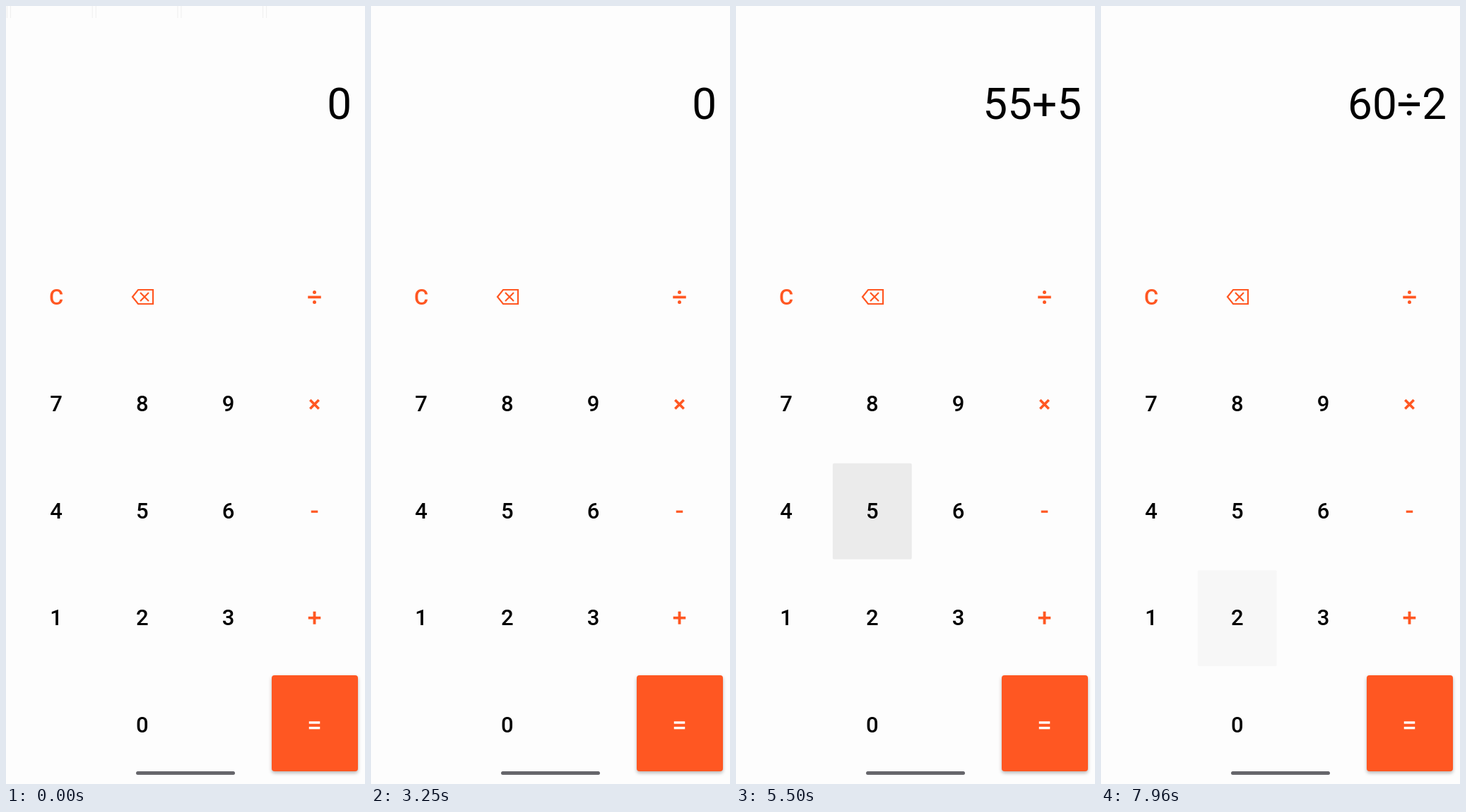
Recreate the animation shown at these times as an HTML page with a canvas. Size 508x1102 px, loop 8000 ms.

```html
<!DOCTYPE html>
<html lang="en">
<head>
<meta charset="utf-8">
<title>Calculator</title>
<style>
  html, body { margin: 0; width: 100%; height: 100%; overflow: hidden; background: #fdfdfd; }
  canvas { display: block; width: 508px; height: 1102px; }
</style>
</head>
<body>
<canvas id="stage"></canvas>
<script>
const W = 508, H = 1102, LOOP = 8000;
const ORANGE = '#ff5722', BLACK = '#000', GREY = '#666';
const colX = c => 71 + c * 121.8;
const rowY = r => 412 + r * 151.4;

const canvas = document.getElementById('stage');
const ctx = canvas.getContext('2d');
const dpr = window.devicePixelRatio || 1;
canvas.width = W * dpr;
canvas.height = H * dpr;

// Each tap: release time, key column and row, then the display it leaves.
const taps = [
  { at: 3580, col: 1, row: 2, main: '5' },
  { at: 4270, col: 1, row: 2, main: '55' },
  { at: 4840, col: 3, row: 3, main: '55+' },
  { at: 5410, col: 1, row: 2, main: '55+5' },
  { at: 5890, col: 3, row: 4, main: '60', formula: '55+5', solid: true },
  { at: 6620, col: 3, row: 0, main: '60÷' },
  { at: 7765, col: 1, row: 3, main: '60÷2' }
];
const HOLD = 120, FADE = 250;

const clamp = v => Math.max(0, Math.min(1, v));

function box(x, y, w, h, r) {
  ctx.beginPath();
  ctx.roundRect(x, y, w, h, r);
}

function text(str, x, y, size, weight, color, align) {
  ctx.font = `${weight} ${size}px Roboto, sans-serif`;
  ctx.textAlign = align;
  ctx.fillStyle = color;
  ctx.fillText(str, x, y);
}

function drawDisplay(t) {
  const state = taps.filter(p => p.at <= t).pop() || { main: '0' };
  if (state.formula) text(state.formula, 488.5, 85, 31, 400, GREY, 'right');
  text(state.main, 489, 160, 62, 400, state.formula ? GREY : BLACK, 'right');
}

function drawRipple(tap, t) {
  const down = tap.at - HOLD;
  if (t < down || t > tap.at + FADE) return;
  const alpha = clamp((t - down) / 75) * (1 - clamp((t - tap.at) / FADE));
  const grow = 1 - (1 - clamp((t - down) / 225)) ** 2;
  const w = tap.solid ? 122 : 112;
  const x = colX(tap.col), y = rowY(tap.row) + (tap.row ? 1 : 0);
  ctx.save();
  box(x - w / 2, y - 68, w, 136, tap.solid ? 4 : 2);
  ctx.clip();
  ctx.beginPath();
  ctx.arc(x, y, 30 + 65 * grow, 0, Math.PI * 2);
  ctx.fillStyle = tap.solid ? `rgba(255,255,255,${0.22 * alpha})` : `rgba(0,0,0,${0.11 * alpha})`;
  ctx.fill();
  ctx.restore();
}

function drawEqualsButton() {
  ctx.save();
  ctx.shadowColor = 'rgba(0,0,0,0.28)';
  ctx.shadowBlur = 5 * dpr;
  ctx.shadowOffsetY = 2.5 * dpr;
  ctx.fillStyle = ORANGE;
  box(376, 948, 122, 136, 4);
  ctx.fill();
  ctx.restore();
}

function drawBackspace() {
  ctx.lineWidth = 2.2;
  ctx.strokeStyle = ORANGE;
  ctx.beginPath();
  ctx.moveTo(179, 412);
  ctx.lineTo(187, 402);
  ctx.lineTo(208, 402);
  ctx.lineTo(208, 422);
  ctx.lineTo(187, 422);
  ctx.closePath();
  for (const s of [-1, 1]) {
    ctx.moveTo(190, 412 - 6 * s);
    ctx.lineTo(202, 412 + 6 * s);
  }
  ctx.stroke();
}

function drawOperators() {
  const x = 436.5;
  const bar = (y, w, h = 3.7) => ctx.fillRect(x - w / 2, y - h / 2, w, h);
  ctx.fillStyle = ORANGE;
  bar(412.4, 18.5);
  for (const y of [405.4, 419.4]) {
    ctx.beginPath();
    ctx.arc(x, y, 2.5, 0, Math.PI * 2);
    ctx.fill();
  }
  bar(716.2, 9.5, 3.2);
  bar(866.7, 17.5);
  bar(866.7, 3.9, 18);
  ctx.lineWidth = 3.6;
  ctx.beginPath();
  for (const s of [-1, 1]) {
    ctx.moveTo(x - 6.2, 564.3 - 6.2 * s);
    ctx.lineTo(x + 6.2, 564.3 + 6.2 * s);
  }
  ctx.stroke();
  ctx.fillStyle = '#fff';
  bar(1015, 15.5, 3.4);
  bar(1022.6, 15.5, 3.4);
}

function drawKeys() {
  ['C', '789', '456', '123', ' 0'].forEach((keys, row) => {
    [...keys].forEach((key, col) => {
      text(key, colX(col), rowY(row) + 11, 31, 500, row ? BLACK : ORANGE, 'center');
    });
  });
  drawBackspace();
  drawOperators();
}

function drawTopSeams(t) {
  const alpha = 1 - clamp((t - 300) / 550);
  if (!alpha) return;
  ctx.fillStyle = `rgba(0,0,0,${0.06 * alpha})`;
  for (let i = 0; i < 4; i++) {
    ctx.fillRect(1 + i * 120.7, 0, 1, 17);
    ctx.fillRect(6 + i * 120.7, 0, 1, 17);
  }
}

function draw(t) {
  ctx.setTransform(dpr, 0, 0, dpr, 0, 0);
  ctx.fillStyle = '#fdfdfd';
  ctx.fillRect(0, 0, W, H);
  drawTopSeams(t);
  drawDisplay(t);
  drawEqualsButton();
  taps.forEach(tap => drawRipple(tap, t));
  drawKeys();
  ctx.fillStyle = '#66666b';
  box(184, 1084, 140, 5, 2.5);
  ctx.fill();
}

const start = performance.now();
function tick() {
  draw((performance.now() - start) % LOOP);
  requestAnimationFrame(tick);
}
tick();
</script>
</body>
</html>
```
